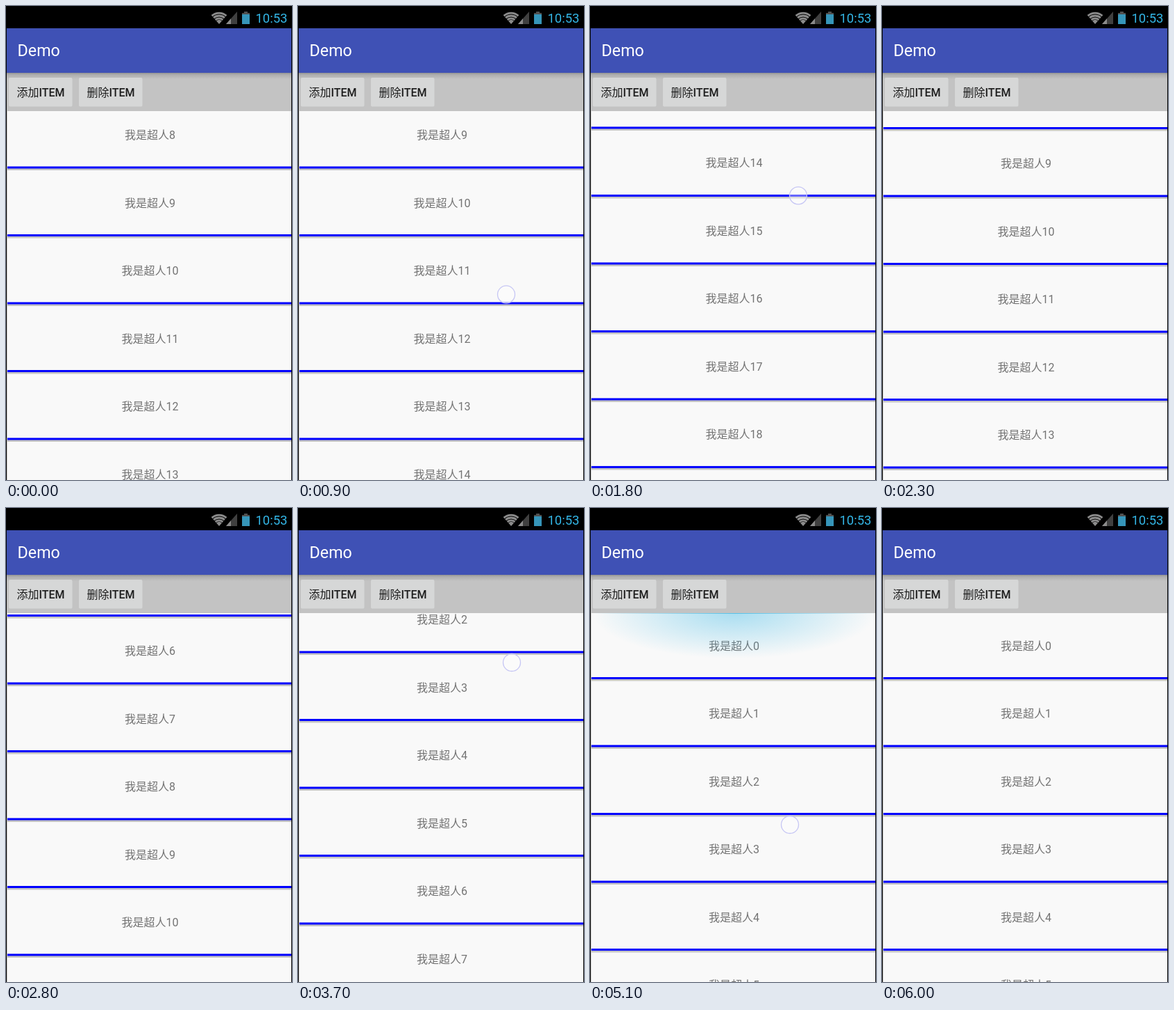
Recreate the animation shown at these times as an HTML page with a canvas. Size 412 px wide and 681 px high, loop 6100 ms.

```html
<!DOCTYPE html>
<html lang="zh-CN">
<head>
<meta charset="utf-8">
<title>Demo</title>
<style>
  html, body { margin: 0; width: 100%; height: 100%; overflow: hidden; background: #000; }
  canvas { display: block; }
</style>
</head>
<body>
<canvas id="stage" width="412" height="681"></canvas>
<script>
const ctx = document.getElementById('stage').getContext('2d');
const LOOP = 6100, STEP = 100;
const LIST_TOP = 151, ROW = 97.5, ROWS = 20;
const FONT = 'Roboto, "Noto Sans CJK SC", "Noto Sans CJK", sans-serif';

// Scroll offset of the list: [ms, px]
const scrollKeys = [
  [0, 792.5], [700, 792.5], [900, 890], [1300, 1324], [1600, 1417], [2000, 1180],
  [2300, 849], [2800, 577.5], [2900, 576.5], [3000, 576.5], [3300, 440],
  [3700, 232.5], [3900, 122], [4100, 60], [4400, 60]
];

// Touches that carry the list along
const drags = [
  { from: 800, to: 1000, x: 300, y: 480 },
  { from: 1700, to: 2000, x: 300, y: 215 },
  { from: 3100, to: 3300, x: 304, y: 220 },
  { from: 3700, to: 3900, x: 308, y: 222 }
];
const PULL = { from: 4400, settle: 5100, release: 5500, x: 288, y: 210, distance: 245 };

const clamp = (v, lo = 0, hi = 1) => Math.min(hi, Math.max(lo, v));
const progress = (t, a, b) => clamp((t - a) / (b - a));
const smooth = u => u * u * (3 - 2 * u);

function slope(i) {
  const gradient = j => (scrollKeys[j + 1][1] - scrollKeys[j][1]) / (scrollKeys[j + 1][0] - scrollKeys[j][0]);
  if (i === 0 || i === scrollKeys.length - 1) return 0;
  const a = gradient(i - 1), b = gradient(i);
  return a * b <= 0 ? 0 : 2 * a * b / (a + b);
}

const pullY = t => PULL.y + PULL.distance * smooth(progress(t, PULL.from, PULL.settle));

function scrollAt(t) {
  if (t >= PULL.from) return Math.max(0, 60 - (pullY(t) - PULL.y));
  const i = scrollKeys.findIndex((key, k) => t < scrollKeys[k + 1][0]);
  const [t0, s0] = scrollKeys[i], [t1, s1] = scrollKeys[i + 1];
  const d = t1 - t0, u = (t - t0) / d, v = 1 - u;
  return s0 * v * v * (1 + 2 * u) + s1 * u * u * (3 - 2 * u)
    + d * u * v * (v * slope(i) - u * slope(i + 1));
}

function rect(color, x, y, w, h) {
  ctx.fillStyle = color;
  ctx.fillRect(x, y, w, h);
}

function polygon(color, points) {
  ctx.fillStyle = color;
  ctx.beginPath();
  points.forEach(([x, y]) => ctx.lineTo(x, y));
  ctx.fill();
}

function text(str, x, y, size, color, weight = 400, align = 'left') {
  ctx.font = `${weight} ${size}px ${FONT}`;
  ctx.textAlign = align;
  ctx.fillStyle = color;
  ctx.fillText(str, x, y);
}

function drawWifi() {
  const x = 307, y = 26, spread = 0.72;
  ctx.fillStyle = ctx.strokeStyle = '#8c8c8c';
  ctx.beginPath();
  ctx.moveTo(x, y);
  ctx.arc(x, y, 6, -Math.PI / 2 - spread, -Math.PI / 2 + spread);
  ctx.fill();
  ctx.lineWidth = 2.8;
  for (const r of [8.2, 12, 15.8]) {
    ctx.beginPath();
    ctx.arc(x, y, r, -Math.PI / 2 - spread, -Math.PI / 2 + spread);
    ctx.stroke();
  }
}

function drawStatusBar() {
  rect('#000', 0, 0, 412, 32);
  drawWifi();
  polygon('#404040', [[317, 26], [333, 8], [333, 26]]);
  polygon('#8c8c8c', [[317, 26], [324, 18], [324, 26]]);
  rect('#505050', 343, 8, 5, 2);
  rect('#505050', 340, 10, 11, 3);
  rect('#3695b9', 340, 12, 11, 14);
  text('10:53', 359.5, 24, 18.4, '#33b5e5');
}

function drawButton(label, x) {
  ctx.fillStyle = '#d6d7d7';
  ctx.beginPath();
  ctx.roundRect(x, 103, 91.5, 41.5, 2);
  ctx.fill();
  text(label, x + 46, 130, 16, '#1c1c1c', 500, 'center');
}

function drawHeader() {
  rect('#3f51b5', 1, 32, 410, 64);
  text('Demo', 16.5, 72, 23.3, '#fff');
  const shadow = ctx.createLinearGradient(0, 96, 0, 105);
  shadow.addColorStop(0, '#929292');
  shadow.addColorStop(0.3, '#aeaeae');
  shadow.addColorStop(1, '#c3c3c3');
  rect(shadow, 1, 96, 410, 9);
  drawButton('添加ITEM', 4);
  drawButton('删除ITEM', 105);
}

function drawList(scroll) {
  for (let n = 0; n < ROWS; n++) {
    const y = LIST_TOP + n * ROW - scroll;
    if (y > 681 || y + ROW < LIST_TOP) continue;
    rect('#f9f9f9', 2, y, 409, 92.5);
    rect('#0000ff', 2, y + 92, 409, 3);
    text('我是超人' + n, 207.5, y + 52.5, 16, '#737373', 400, 'center');
  }
}

function drawGlow(t) {
  const strength = smooth(progress(t, 4600, 5000)) * (1 - progress(t, PULL.release, 6000));
  if (!strength) return;
  ctx.save();
  ctx.translate(208, LIST_TOP);
  ctx.scale(1, 0.32);
  const glow = ctx.createRadialGradient(0, 0, 0, 0, 0, 204);
  glow.addColorStop(0, `rgba(51,181,229,${0.4 * strength})`);
  glow.addColorStop(1, 'rgba(51,181,229,0)');
  rect(glow, -206, 0, 409, 204);
  ctx.restore();
  const half = 30 + 175 * strength;
  const edge = ctx.createLinearGradient(210 - half, 0, 210 + half, 0);
  edge.addColorStop(0, 'rgba(51,181,229,0)');
  edge.addColorStop(0.5, `rgba(51,181,229,${0.7 * strength})`);
  edge.addColorStop(1, 'rgba(51,181,229,0)');
  rect(edge, 2, LIST_TOP, 409, 1);
}

function drawTouch(x, y) {
  ctx.beginPath();
  ctx.arc(x, y, 12.5, 0, Math.PI * 2);
  ctx.fillStyle = 'rgba(255,255,255,0.4)';
  ctx.fill();
  ctx.lineWidth = 1.3;
  ctx.strokeStyle = '#c6c6f4';
  ctx.stroke();
}

function draw(t) {
  const scroll = scrollAt(t);
  rect('#000', 0, 0, 412, 681);
  rect('#c3c3c3', 1, 96, 410, 585);
  ctx.save();
  ctx.beginPath();
  ctx.rect(2, LIST_TOP, 409, 530);
  ctx.clip();
  drawList(scroll);
  drawGlow(t);
  ctx.restore();
  drawStatusBar();
  drawHeader();
  const drag = drags.find(d => t >= d.from && t <= d.to);
  if (drag) drawTouch(drag.x, drag.y + scrollAt(drag.from) - scroll);
  if (t >= PULL.from && t < PULL.release) drawTouch(PULL.x, pullY(t));
}

function frame() {
  const t = performance.now() % LOOP;
  draw(Math.floor(t / STEP) * STEP);
  requestAnimationFrame(frame);
}
frame();
</script>
</body>
</html>
```
